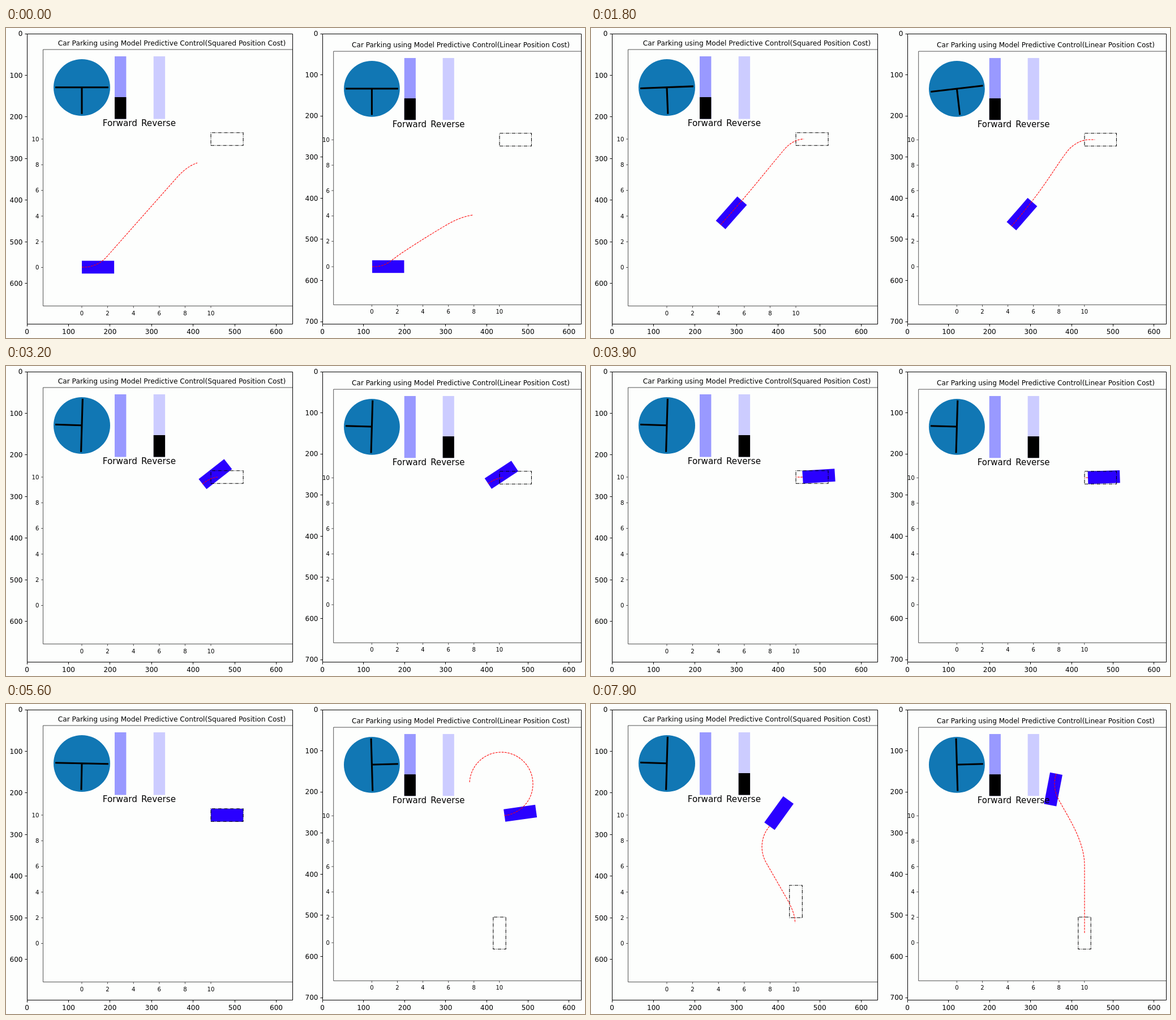
Recreate the animation shown at these times as an HTML page. Size 1023x547 px, loop 8 s.

```html
<!DOCTYPE html>
<html lang="en">
<head>
<meta charset="utf-8">
<title>Car parking</title>
<style>
html, body { margin: 0; width: 100%; height: 100%; overflow: hidden; background: #fdfefd; }
svg { display: block; width: 100%; height: 100%; font-family: "DejaVu Sans", sans-serif; }
</style>
</head>
<body>
<svg id="stage" viewBox="0 0 1023 547"></svg>
<script>
const STEP = 100, STEPS = 80, STOP = 39, UNIT = 22.65, LOCK = 91.7;
const TOP = 10.5, BOTTOM = 522.5;
const stage = document.getElementById('stage');
const lerp = (a, b, u) => a + (b - a) * u;
const clamp = u => Math.max(0, Math.min(1, u));
const snap = v => Math.floor(v) + 0.5;

// Linear interpolation in a list of [step, value]
function track(keys, k) {
  let i = 0;
  while (i < keys.length - 2 && k >= keys[i + 1][0]) i++;
  const [a, b] = [keys[i], keys[i + 1]];
  return lerp(a[1], b[1], clamp((k - a[0]) / (b[0] - a[0])));
}

function curve(d, tail = 0) {
  const el = document.createElementNS('http://www.w3.org/2000/svg', 'path');
  el.setAttribute('d', d);
  return { len: el.getTotalLength() - tail, at: s => el.getPointAtLength(Math.max(0, s)) };
}

// Car model: thrust and drag, distance and speed after n steps
function drive(pedal, n) {
  let s = 0, v = 0;
  for (let i = 0; i < n; i++) {
    s += 0.2 * v;
    v = 0.96 * v + 0.2 * pedal(i);
  }
  return { s, v };
}

const panels = [
  {
    x: 134, y: 422.3, zoom: 1, edge: 506.5, cost: 'Squared',
    frame: [37.5, 506.5], gap: [73.4, 73.5], rows: 7,
    coast: 0, parked: 47, leave: 68, gear: -1,
    goals: [[362, 196, 0], [362, 377, -90]],
    first: curve('M134 422H137C152.6 422 167.5 415.4 177.9 403.8L300 266C308 257 320 244 338 238'),
    go: curve('M134 422H137C152.6 422 167.5 415.4 177.9 403.8C219 359 261 312.5 300 264.5C312 249.8 328 230.5 340 216C349 205 361 197 374 196h4', 4),
    back: curve('M374 196C370 196.3 366 196 362 196'),
    next: curve('M362 196H358A56 56 0 0 0 309.3 279.6L344 340C354 357 360.5 372 360.5 386V392'),
    reach: L => [[0, 278], [11, L + 4], [26, L]],
    reach2: [[68, 246], [79, 240]],
    wheel: [[0, 0], [1, LOCK], [9, LOCK], [11, 31], [12, 3], [20, 2], [26, 6.2], [28, 5], [31, -LOCK],
      [39, -LOCK], [40, LOCK], [44, LOCK], [47, 0], [56, -1.2], [67, -1.2], [68, 13], [69, -LOCK], [79, -LOCK]]
  },
  {
    x: 646.4, y: 421, zoom: 0.9885, edge: 508.4, cost: 'Linear',
    frame: [559.5, 1016.5], gap: [72.6, 72.6], rows: 8,
    coast: -0.2, parked: 46, leave: 52, gear: 1,
    goals: [[872, 197, 0], [872, 376, 90]],
    first: curve('M647 421H651C664 421 674 416 692 402C715 386 760 358 781 346C795 338 810 332 825 330'),
    go: curve('M647 421H651C664.7 421 677.8 415.8 687.8 406.5C733 363.8 774.3 315.9 809 264.5C819 250 831 231 842 217C850 207 864 198 878 197h23', 23),
    back: curve('M878 197C876 197.1 874 197 872 197'),
    next: curve('M872 197H874.5A56 56 0 1 0 825.1 166.4C841 197 872 240 872 285V404'),
    reach: L => [[0, 202], [11, L + 23], [26, L]],
    reach2: [[52, 205], [56, 265], [68, 468], [72, 542], [79, 542]],
    wheel: [[0, 0], [1, LOCK], [8, LOCK], [10, 20], [11, 4.3], [26, 9.3], [28, 9], [31, -LOCK],
      [39, -LOCK], [40, LOCK], [44, LOCK], [46, 0], [51, 0], [52, LOCK], [79, LOCK]]
  }
];

const text = (x, y, size, anchor, s) =>
  `<text x="${x}" y="${y}" font-size="${size}" text-anchor="${anchor}">${s}</text>`;

function outerAxes({ frame: [l, r], gap, rows }) {
  let ticks = '', labels = '';
  for (let i = 0; i < rows; i++) {
    const y = 9.9 + i * gap[1];
    ticks += `M${l} ${i ? snap(y) : TOP}h-4`;
    labels += text(l - 8, y + 4.3, 12, 'end', i * 100);
  }
  for (let i = 0; i < 7; i++) {
    const x = l - 0.4 + i * gap[0];
    ticks += `M${snap(x)} ${BOTTOM}v4`;
    labels += text(x, 539.6, 12, 'middle', i * 100);
  }
  return `<path d="M${l} ${TOP}H${r}V${BOTTOM}H${l}Z${ticks}" fill="none" stroke="#000"/>${labels}`;
}

function innerAxes({ edge, cost }) {
  let ticks = '', labels = '';
  for (let i = 0; i <= 10; i += 2) {
    const x = 134 + i * 22.8, y = 422.5 - i * 22.65;
    ticks += `M${x} 490.5v3.5M65.5 ${y}h-3.5`;
    labels += text(x, 506.5, 10.13, 'middle', i) + text(58.5, y + 3.7, 10.13, 'end', i);
  }
  return `<path d="M${edge} 38H65.5V490.5H${edge}${ticks}" fill="none" stroke="#333" stroke-width=".85"/>` + labels +
    text(293, 31, 12.22, 'middle', `Car Parking using Model Predictive Control(${cost} Position Cost)`) +
    text(170.8, 173, 15.2, 'start', 'Forward') + text(239, 173, 15.2, 'start', 'Reverse');
}

function build(p) {
  const place = `translate(${p.x} ${p.y}) scale(${p.zoom}) translate(-134 -422.3)`;
  const g = document.createElementNS('http://www.w3.org/2000/svg', 'g');
  const w = 57.1 * p.zoom, h = 22.6 * p.zoom;
  g.innerHTML = `
    <g transform="${place}">
      <circle cx="134" cy="105" r="50" fill="#1177b4"/>
      <path class="wheel" d="M-47 0H47M0 0V47" stroke="#000" stroke-width="3.1"/>
      <rect x="192" y="50" width="20.4" height="110.5" fill="#9999ff"/>
      <rect x="260.7" y="50" width="20.4" height="110.5" fill="#ccccff"/>
      <rect class="pedal" width="20.4"/>
    </g>
    <rect class="car" y="${-h / 2}" width="${w}" height="${h}" fill="#2a00ff"/>
    <path class="goal" d="M0 ${h / 2}H${w}V${-h / 2}H0Z" fill="none" stroke="#000" stroke-width="1.05" stroke-dasharray="6.5 1.6 1 1.6"/>
    <path class="plan" fill="none" stroke="#f00" stroke-width="1.05" stroke-dasharray="3.75 1.6"/>
    <g transform="${place}">${innerAxes(p)}</g>${outerAxes(p)}`;
  stage.append(g);
  for (const name of ['wheel', 'pedal', 'car', 'goal', 'plan']) p[name + 'El'] = g.querySelector('.' + name);
  p.throttle = i => i < 27 ? 1 : i === 27 ? p.coast : -1;
  p.scale = p.go.len / drive(p.throttle, STOP + 1).s;
}

function pedalAt(p, k) {
  if (k >= p.leave) return p.gear;
  if (k <= STOP) return p.throttle(k);
  if (k > p.parked) return 0;
  return k <= (STOP + p.parked) / 2 ? -1 : 1;
}

// Current curve, distance along it, end of the planned part, gear and lead of the heading
function motion(p, k) {
  if (k < STOP) {
    const { s, v } = drive(p.throttle, k + 1);
    return { way: p.go, s: s * p.scale, end: track(p.reach(p.go.len), k), gear: 1, lead: v * 0.1 * p.scale };
  }
  if (k < p.leave) {
    const u = clamp((k - STOP) / (p.parked - STOP));
    return { way: p.back, s: p.back.len * u * u * (3 - 2 * u), end: p.back.len, gear: -1, lead: 0 };
  }
  const { s, v } = drive(() => 1, k - p.leave + 1);
  return { way: p.next, s: s * UNIT, end: track(p.reach2, k), gear: p.gear, lead: v * 0.1 * UNIT };
}

function plan(p, k, { way, s, end }) {
  if (end - s < 0.5) return '';
  const fade = k < STOP ? clamp(1 - k / 8) : 0, pts = [];
  for (let i = 0; i <= 60; i++) {
    const u = i / 60, a = way.at(lerp(s, end, u));
    let { x, y } = a;
    if (fade) {
      const b = p.first.at(lerp(s, p.first.len, u)), w = fade * Math.min(1, 5 * u);
      x = lerp(x, b.x, w);
      y = lerp(y, b.y, w);
    }
    pts.push(x.toFixed(2) + ' ' + y.toFixed(2));
  }
  return 'M' + pts.join('L');
}

function update(p, k) {
  const m = motion(p, k), pos = m.way.at(m.s);
  const a = m.way.at(m.s + m.lead - 1), b = m.way.at(m.s + m.lead + 1);
  const angle = Math.atan2(m.gear * (b.y - a.y), m.gear * (b.x - a.x)) * 180 / Math.PI;
  p.carEl.setAttribute('transform', `translate(${pos.x} ${pos.y}) rotate(${angle})`);
  const [gx, gy, turn] = p.goals[k < p.leave ? 0 : 1];
  p.goalEl.setAttribute('transform', `translate(${gx} ${gy}) rotate(${turn})`);
  p.planEl.setAttribute('d', plan(p, k, m));
  p.wheelEl.setAttribute('transform', `translate(134 104.7) rotate(${-track(p.wheel, k)})`);
  const pedal = pedalAt(p, k), h = 38.5 * Math.abs(pedal);
  p.pedalEl.setAttribute('x', pedal < 0 ? 260.7 : 192);
  p.pedalEl.setAttribute('y', 160.5 - h);
  p.pedalEl.setAttribute('height', h);
}

panels.forEach(build);
let shown = -1;
function tick() {
  const k = Math.floor(performance.now() / STEP) % STEPS;
  if (k !== shown) panels.forEach(p => update(p, k));
  shown = k;
  requestAnimationFrame(tick);
}
tick();
</script>
</body>
</html>
```
